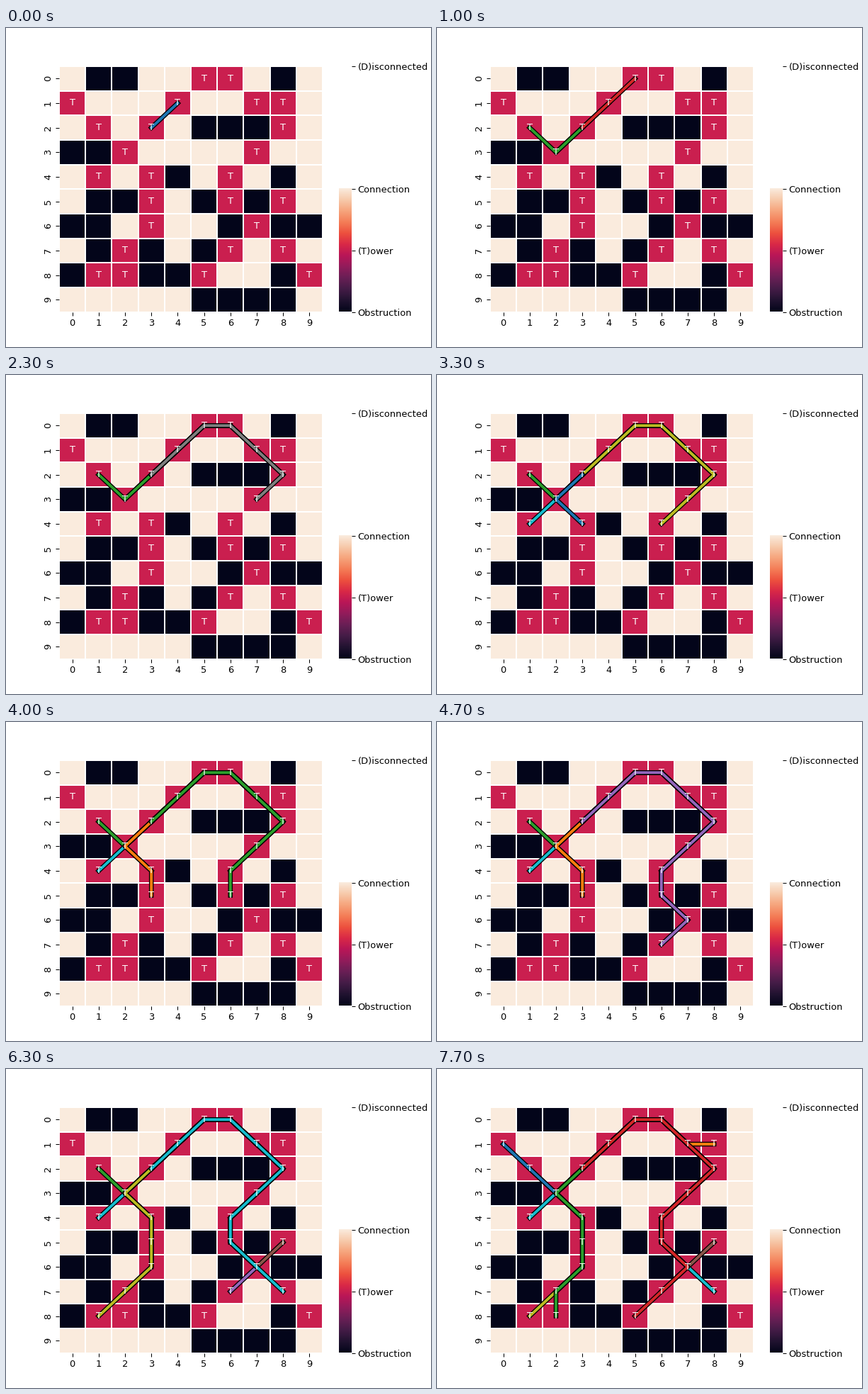
A matplotlib script that plays this animation: 600x450 px, repeating every 8 s.

```python
import matplotlib.pyplot as plt
from matplotlib.animation import FuncAnimation
from matplotlib.colors import LinearSegmentedColormap
from matplotlib.patheffects import Normal, Stroke
import numpy as np

DPI = 93.75
FRAMES, INTERVAL = 80, 100

# '#' obstruction, 'T' tower, '.' free cell
BOARD = """
.##..TT.#.
T...T..TT.
.T.T.###T.
##T....T..
.T.T#.T.#.
.##T.#T#T.
##.T..#T##
.#T#.#T.T.
#TT##T..#T
.....####.
""".split()

# Towers as (column, row) in the order they get connected, with their parent
ROOT = (3, 2)
PARENT = {
    (4, 1): ROOT, (2, 3): ROOT, (1, 2): (2, 3),
    (5, 0): (4, 1), (6, 0): (5, 0), (7, 1): (6, 0),
    (8, 2): (7, 1), (7, 3): (8, 2), (6, 4): (7, 3),
    (1, 4): (2, 3), (3, 4): (2, 3), (3, 5): (3, 4),
    (6, 5): (6, 4), (7, 6): (6, 5), (6, 7): (7, 6), (8, 5): (7, 6),
    (3, 6): (3, 5), (2, 7): (3, 6), (1, 8): (2, 7), (8, 7): (7, 6),
    (0, 1): (1, 2), (8, 1): (7, 1), (2, 8): (2, 7), (5, 8): (6, 7),
}

ROCKET = LinearSegmentedColormap.from_list("rocket", [
    "#03051a", "#221331", "#451c47", "#691f55", "#921c5b", "#b91657",
    "#d92847", "#ed503e", "#f47d57", "#f6a47c", "#f7c9aa", "#faebdd"], N=256)


def path_to(tower):
    path = [tower]
    while path[-1] != ROOT:
        path.append(PARENT[path[-1]])
    return np.array(path[::-1]) + 0.5


def hide_spines(ax):
    for spine in ax.spines.values():
        spine.set_visible(False)


plt.rcParams["font.family"] = "DejaVu Sans"
plt.rcParams["font.size"] = 10
fig = plt.figure(figsize=(600 / DPI, 450 / DPI), dpi=DPI, facecolor="white")

# Heatmap
ax = fig.add_axes([0.125, 0.11, 0.62, 0.77])
levels = np.array([["#T.".index(cell) for cell in row] for row in BOARD])
ax.pcolormesh(levels, cmap=ROCKET, vmin=0, vmax=2,
              edgecolors="white", linewidth=1.5)
ax.set(xlim=(0, 10), ylim=(10, 0))
ax.set_xticks(np.arange(10) + 0.5, range(10))
ax.set_yticks(np.arange(10) + 0.5, range(10), rotation=90, va="center")
hide_spines(ax)
for row, col in np.argwhere(levels == 1):
    ax.text(col + 0.5, row + 0.5, "T", color="white", ha="center", va="center")

# Colour scale: the gradient fills only the lower half of the axis
bar = fig.add_axes([0.78375, 0.11, 0.028875, 0.77])
bar.imshow(np.linspace(0, 1, 256)[:, None], cmap=ROCKET, origin="lower",
           extent=(0, 1, 0, 2), aspect="auto")
bar.set(xlim=(0, 1), ylim=(0, 4), xticks=[])
bar.yaxis.tick_right()
bar.set_yticks([0, 1, 2, 4],
               ["Obstruction", "(T)ower", "Connection", "(D)isconnected"])
bar.patch.set_visible(False)
hide_spines(bar)

outline = [Stroke(linewidth=5, foreground="black"), Normal()]
lines = []
for i, tower in enumerate(PARENT):
    line, = ax.plot(*path_to(tower).T, color=f"C{i % 10}", lw=3,
                    path_effects=outline)
    lines.append(line)


def update(frame):
    newest = int((frame + 0.5) * len(lines) / FRAMES)
    for i, line in enumerate(lines):
        line.set_visible(i <= newest)
    return lines


anim = FuncAnimation(fig, update, frames=FRAMES, interval=INTERVAL,
                     repeat=True, repeat_delay=0)
plt.show()
```
